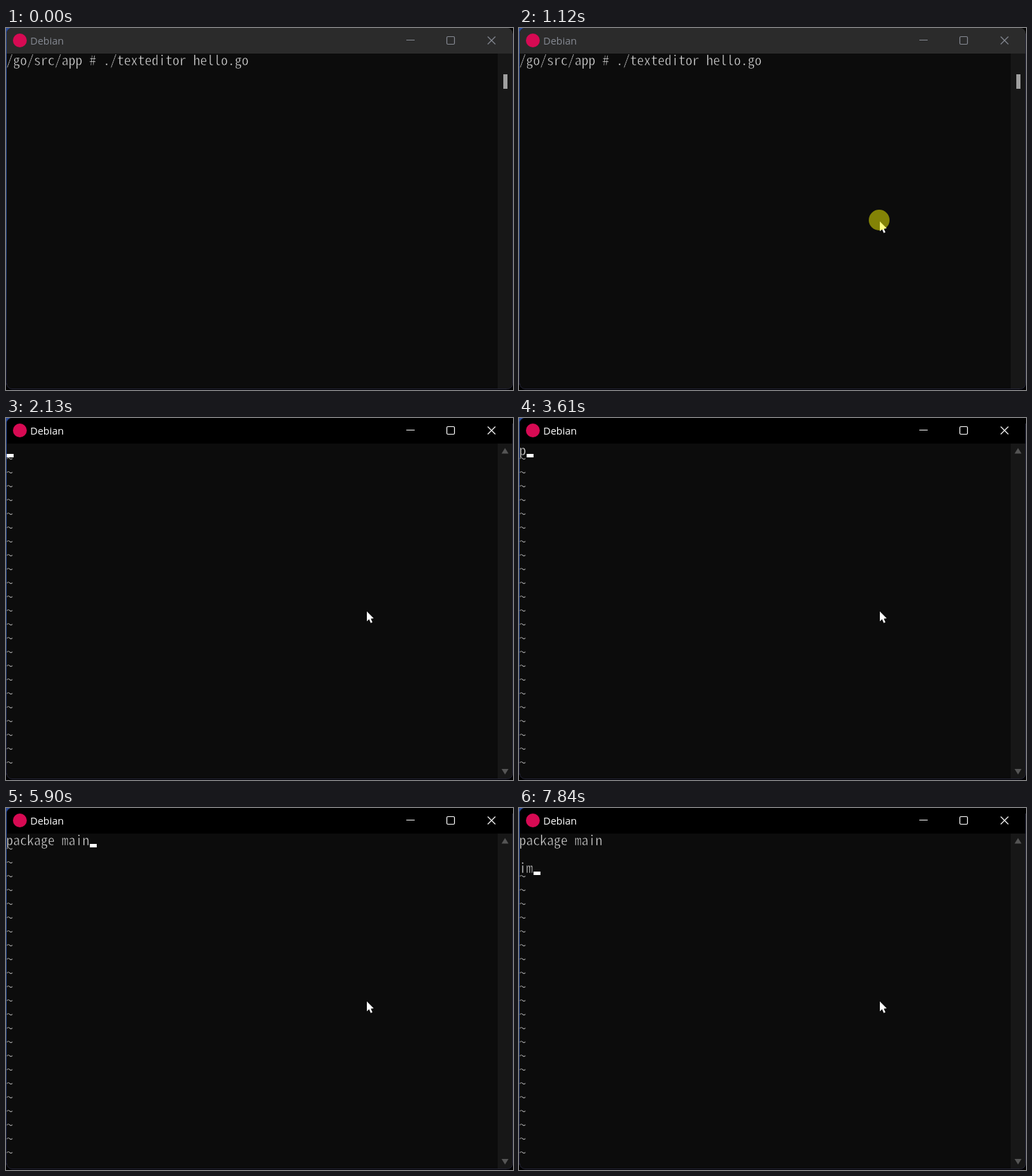
Animation of 732x524 px, one loop 8000 ms. Source, as an HTML page:

```html
<!DOCTYPE html>
<html lang="en">
<head>
<meta charset="utf-8">
<title>Text editor</title>
<style>
html, body { margin: 0; width: 100%; height: 100%; overflow: hidden; background: #000; }
svg { display: block; }
.mono text {
  font: 300 20px "Noto Sans Mono CJK JP", "Noto Sans CJK JP", "Noto Sans Mono", monospace;
  font-feature-settings: "hwid";
  fill: #dadada; stroke: #0c0c0c; stroke-width: .55px;
  white-space: pre;
}
.title { font: 14.6px "Open Sans", "Noto Sans", sans-serif; }
</style>
</head>
<body>
<svg width="732" height="524" viewBox="0 0 732 524">
  <defs>
    <linearGradient id="edge" x2="0" y2="1">
      <stop offset="0" stop-color="#2c4c9c"/>
      <stop offset=".6" stop-color="#27488c"/>
      <stop offset="1" stop-color="#15152f"/>
    </linearGradient>
    <clipPath id="win"><rect x="1" width="730.5" height="522" rx="8"/></clipPath>
  </defs>
  <rect width="10" height="516" fill="url(#edge)"/>
  <g clip-path="url(#win)">
    <rect width="732" height="524" fill="#0c0c0c"/>
    <rect id="bar" width="732" height="37"/>
    <rect x="710" y="37" width="22" height="487" fill="#171717"/>
  </g>
  <path d="M731.5 8V514.5a8 8 0 0 1-8 8H9a8 8 0 0 1-8-8" fill="none" stroke="#26263a"/>
  <circle cx="20" cy="18" r="10" fill="#d70a53"/>
  <g id="head">
    <text class="title" x="35" y="24" fill="currentColor">Debian</text>
    <g fill="none" stroke="currentColor" stroke-width="1.2">
      <path d="M578 17.5h12M695.5 12.5l11 11m0-11l-11 11"/>
      <rect x="636.5" y="12.5" width="11" height="11" rx="1.5"/>
    </g>
  </g>
  <rect id="thumb" x="718" y="67" width="6" height="21" fill="#9f9f9f"/>
  <path id="arrows" d="M715.5 51.5l5-8 5 8zM715.5 508l5 8 5-8z" fill="#555"/>
  <g id="lines" class="mono"></g>
  <g id="tildes" class="mono"></g>
  <rect id="caret" width="10" height="5" fill="#fff"/>
  <path id="mouse" d="M0 0V14.2L3.2 11.3 5.7 16.8 8 15.8 5.7 10.4 9.9 10Z" fill="#fff"/>
  <circle id="click" cx="520" cy="278" r="15" fill="#ff0" opacity=".49"/>
</svg>
<script>
const LOOP = 8000, OPEN = 2130, ROWS = 24;
const COMMAND = "/go/src/app # ./texteditor hello.go";
const TYPED = "package main\n\nim";
const KEYS = [3610, 3780, 4220, 4320, 4420, 4720, 4840, 5330,
  5540, 5660, 5780, 5900, 6870, 7090, 7350, 7840];

const $ = id => document.getElementById(id);
const show = (id, on) => $(id).style.display = on ? "" : "none";

function addText(parent, y) {
  const el = document.createElementNS("http://www.w3.org/2000/svg", "text");
  el.setAttribute("y", y);
  return $(parent).appendChild(el);
}

// One x per character keeps the terminal's 10px columns.
function setText(el, s) {
  if (el.textContent === s) return;
  el.setAttribute("x", [...s].map((c, i) => 0.2 + 10 * i).join(" "));
  el.textContent = s;
}

const lines = [0, 1, 2].map(row => addText("lines", 54 + 20 * row));
const tildes = Array.from({ length: ROWS }, (_, row) => addText("tildes", 46 + 20 * row));
tildes.forEach(el => setText(el, "~"));

function draw(t) {
  const editing = t >= OPEN, focused = t >= 1160;
  $("bar").setAttribute("fill", focused ? "#000" : "#2b2b2b");
  $("head").setAttribute("color", focused ? "#fff" : "#858992");
  show("thumb", !editing);
  show("arrows", editing);

  const typed = TYPED.slice(0, KEYS.filter(k => k <= t).length);
  const text = (editing ? typed : COMMAND).split("\n");
  lines.forEach((el, i) => setText(el, text[i] || ""));
  tildes.forEach((el, i) => el.style.display = editing && i >= text.length ? "" : "none");

  const row = text.length - 1;
  show("caret", t >= 1690);
  $("caret").setAttribute("x", 1 + 10 * text[row].length);
  $("caret").setAttribute("y", 52 + 20 * row);

  // The pointer glides in, slowing down, in 30 ms steps.
  const step = Math.max(0, Math.min(7, Math.floor((t - 300) / 30)));
  const left = (1 - step / 7) ** 3;
  show("mouse", t >= 300);
  $("mouse").setAttribute("transform",
    `translate(${Math.round(521 + 133 * left)} ${Math.round(280 + 216 * left)})`);
  show("click", t >= 1120 && t < 1260);
}

const start = performance.now();
function frame() {
  draw((performance.now() - start) % LOOP);
  requestAnimationFrame(frame);
}
frame();
</script>
</body>
</html>
```
